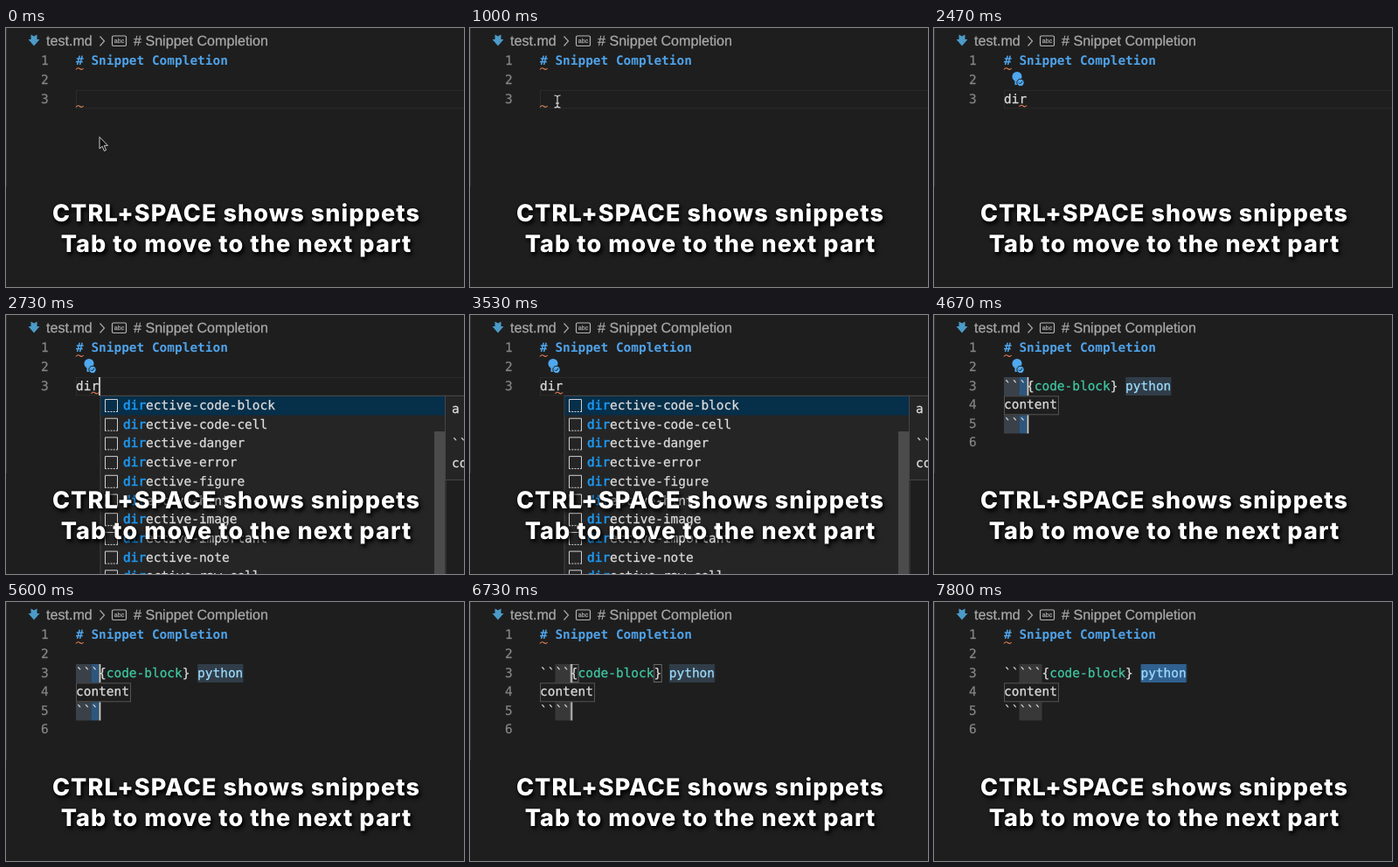
Write an HTML page that moves like this. It is 524 px wide and 296 px high and loops after 8 s.

```html
<!DOCTYPE html>
<html lang="en">
<head>
<meta charset="utf-8">
<title>Snippet Completion</title>
<style>
html, body { margin: 0; width: 100%; height: 100%; overflow: hidden; background: #1e1e1e; }
svg { display: block; width: 524px; height: 296px; }
text { white-space: pre; text-rendering: geometricPrecision; }
.code { font: 14.45px "DejaVu Sans Mono", monospace; color: #dcdcdc; }
.code text, .crumb text { fill: currentColor; stroke: currentColor; stroke-width: .25; }
.code .head { font-weight: 700; color: #4fa3ea; stroke: none; }
.code .num { color: #858585; }
.code .hit { color: #1c9bf6; stroke-width: .5; }
.code .name { color: #3fc9a2; }
.code .arg { color: #9cdcfe; }
.crumb { font: 16.1px "Liberation Sans", Arial, sans-serif; color: #a9a9a9; }
.title { font: 800 27px Inter, "Open Sans", sans-serif; letter-spacing: 1.1px; fill: #fff;
  text-anchor: middle; filter: drop-shadow(0 0 1.5px #000a) drop-shadow(2px 3px 2px #000); }
.wave { fill: none; stroke: #df7d55; stroke-width: 1.1; }
.box { fill: none; stroke: #6a6a6a; }
.caret { fill: #d6d6d4; }
.slot { fill: #383838; }

/* every clock-driven part shares one 8 s loop */
.move, .arrow, .beam, .type, .live, .hint, .fix, .menu, .info, .insert, .pick, .slot,
.tick4, .tick5, .tail, .pair, .caret, .chosen, .idle { animation: 8s step-end infinite; }

.move { animation-name: move; animation-timing-function: linear; }
@keyframes move {
  0%, .9% { transform: translate(107px, 124px); animation-timing-function: ease-in-out; }
  7.5%, 100% { transform: translate(100px, 84px); }
}
.arrow { animation-name: arrow; }
@keyframes arrow { 0% { opacity: 1 } 3.3%, 100% { opacity: 0 } }
.beam { animation-name: beam; }
@keyframes beam { 0% { opacity: 0 } 3.3% { opacity: 1 } 15.87%, 100% { opacity: 0 } }

/* typing "dir" */
.d { animation-name: key-d; }
.i { animation-name: key-i; }
.r { animation-name: key-r; }
@keyframes key-d { 0% { opacity: 0 } 15.87% { opacity: 1 } 57.5%, 100% { opacity: 0 } }
@keyframes key-i { 0% { opacity: 0 } 19.1% { opacity: 1 } 57.5%, 100% { opacity: 0 } }
@keyframes key-r { 0% { opacity: 0 } 21.2% { opacity: 1 } 57.5%, 100% { opacity: 0 } }
.live { animation-name: live; }
@keyframes live { 0% { opacity: 1 } 57.5%, 100% { opacity: 0 } }
.hint { animation-name: hint; }
@keyframes hint { 0% { opacity: 1 } 26.6%, 100% { opacity: 0 } }
.fix { animation-name: fix; }
@keyframes fix { 0% { opacity: 0 } 26.6% { opacity: 1 } 66.2%, 100% { opacity: 0 } }
.menu { animation-name: menu; }
@keyframes menu { 0% { opacity: 0 } 31.6% { opacity: 1 } 57.5%, 100% { opacity: 0 } }
.info { animation-name: info; }
@keyframes info { 0% { opacity: 0 } 33.2% { opacity: 1 } 57.5%, 100% { opacity: 0 } }

/* inserted snippet */
.insert { animation-name: insert; }
@keyframes insert { 0% { opacity: 0 } 57.5%, 100% { opacity: 1 } }
.pick { animation-name: pick; }
@keyframes pick { 0% { opacity: 1 } 80%, 100% { opacity: 0 } }
.slot { animation-name: slot; }
@keyframes slot {
  0% { width: 0 } 80% { width: 8.7px } 83.3% { width: 17.4px } 86.6%, 100% { width: 26.1px }
}
.tick4 { animation-name: tick4; }
@keyframes tick4 { 0% { opacity: 0 } 83.3%, 100% { opacity: 1 } }
.tick5 { animation-name: tick5; }
@keyframes tick5 { 0% { opacity: 0 } 86.6%, 100% { opacity: 1 } }
.tail { animation-name: tail; }
@keyframes tail {
  0% { transform: translateX(0) } 83.3% { transform: translateX(8.7px) }
  86.6%, 100% { transform: translateX(17.4px) }
}
.pair { animation-name: pair; }
@keyframes pair { 0% { opacity: 0 } 80% { opacity: 1 } 91.6%, 100% { opacity: 0 } }
.idle { animation-name: idle; }
@keyframes idle { 0% { opacity: 1 } 91.6%, 100% { opacity: 0 } }
.chosen { animation-name: chosen; }
@keyframes chosen { 0% { opacity: 0 } 91.6%, 100% { opacity: 1 } }

/* carets */
.caret.first { animation-name: caret-first; }
@keyframes caret-first {
  0% { opacity: 0; transform: translateX(0) }
  6.6% { opacity: 1 } 12.4% { opacity: 0 }
  15.87% { opacity: 1; transform: translateX(8.7px) }
  19.1% { transform: translateX(17.4px) }
  21.2% { transform: translateX(26.1px) }
  27.4% { opacity: 0 } 33.5% { opacity: 1 } 40% { opacity: 0 } 46.2% { opacity: 1 }
  52.5%, 100% { opacity: 0; transform: translateX(26.1px) }
}
.caret.multi { animation-name: caret-multi; }
@keyframes caret-multi {
  0% { opacity: 0; transform: translateX(0) }
  57.5% { opacity: 1 } 63.1% { opacity: 0 } 69.4% { opacity: 1 } 75.6% { opacity: 0 } 80% { opacity: 1 }
  83.3% { transform: translateX(8.7px) }
  86.6% { transform: translateX(17.4px) }
  91.6%, 100% { opacity: 0; transform: translateX(17.4px) }
}
.caret.last { animation-name: caret-last; }
@keyframes caret-last { 0% { opacity: 0 } 91.6% { opacity: 1 } 97.4%, 100% { opacity: 0 } }
</style>
</head>
<body>
<svg viewBox="0 0 524 296" xmlns="http://www.w3.org/2000/svg">
  <rect width="524" height="296" fill="#1e1e1e"/>
  <rect width="1" height="181" fill="#363636"/>

  <g class="crumb">
    <path d="M28.500 7.500l3.500 2 3.500-2v5.500h3l-6.500 7.500-6.500-7.500h3z" fill="#4b9bc8"/>
    <text x="46" y="20">test.md</text>
    <path d="M107.500 9.500l5 5.500-5 5.500" fill="none" stroke="#a9a9a9" stroke-width="1.200"/>
    <rect x="121.500" y="9" width="16" height="11.500" rx="1.500" fill="none" stroke="#b4b4b4" stroke-width="1.200"/>
    <text x="129.500" y="17" text-anchor="middle" style="font-size:7px">abc</text>
    <text x="146" y="20"># Snippet Completion</text>
  </g>

  <g class="code">
    <text class="num" x="40" y="42">1</text>
    <text class="num" x="40" y="63.700">2</text>
    <text class="num" x="40" y="85.500">3</text>
    <text class="head" x="80" y="42"># Snippet Completion</text>
    <path class="wave" d="M80 47.500q2.200-3 4.400-1t4.400-.5"/>

    <g class="live">
      <rect x="80.500" y="71.300" width="450" height="20.500" fill="none" stroke="#2b2b2b"/>
      <path class="wave hint" d="M80 90.500q2.200-3 4.400-1t4.400-.5" style="stroke:#cf8a5a"/>
    </g>
    <g class="fix">
      <path class="wave" d="M97.400 90q2.200-3 4.400-1t4.400-.5"/>
      <circle cx="95" cy="55.500" r="5.500" fill="#4fa8f0"/>
      <path d="M92.500 60h5v5h-5z" fill="#4fa8f0"/>
      <circle cx="99" cy="62.500" r="4.200" fill="#4fa8f0" stroke="#1e1e1e"/>
      <path d="M97 62.500l1.500 1.500 2.500-3" fill="none" stroke="#1e1e1e"/>
    </g>
    <text class="type d" x="80" y="85.500">d</text>
    <text class="type i" x="88.700" y="85.500">i</text>
    <text class="type r" x="97.400" y="85.500">r</text>
    <rect class="caret first" x="80" y="71" width="1.800" height="21"/>

    <g class="menu">
      <rect x="108" y="92.500" width="395" height="220" fill="#252526" stroke="#454545"/>
      <rect x="108.500" y="93" width="394" height="21.500" fill="#062f4a"/>
      <g id="rows"></g>
      <rect x="490" y="133" width="12" height="163" fill="#4b4b4c"/>
    </g>
    <g class="info">
      <rect x="502.500" y="92.500" width="40" height="96" fill="#252526" stroke="#454545"/>
      <text x="510" y="112">a</text>
      <text x="510" y="152">``</text>
      <text x="510" y="174">co</text>
    </g>

    <g class="insert">
      <text class="num" x="40" y="107">4</text>
      <text class="num" x="40" y="128.700">5</text>
      <text class="num" x="40" y="150.200">6</text>
      <g id="fences"></g>
      <g class="tail">
        <rect class="idle" x="219.200" y="71" width="52.200" height="21" fill="#303d48"/>
        <rect class="chosen" x="219.200" y="71" width="52.200" height="21" fill="#30608f"/>
        <g class="pair">
          <rect class="box" x="106.500" y="71.500" width="8.700" height="20"/>
          <rect class="box" x="201.800" y="71.500" width="8.700" height="20"/>
        </g>
        <text x="106.100" y="85.500">{<tspan class="name">code-block</tspan>} <tspan class="arg">python</tspan></text>
      </g>
      <rect class="box" x="80.500" y="92.800" width="62" height="21" style="stroke:#545454"/>
      <text x="80" y="107">content</text>
      <g id="carets"></g>
      <rect class="caret last" x="288.200" y="71" width="1.800" height="21"/>
    </g>
  </g>

  <g class="move">
    <path class="arrow" d="M0 .5v13.500l3.100-2.800 2.300 5.300 2.200-1-2.300-5.200h4.200z" fill="#111" stroke="#ddd" stroke-width=".9"/>
    <path class="beam" d="M-3.500-7q3 0 3.500 1.500 .5-1.500 3.500-1.500M0-5.500v11M-3.500 7q3 0 3.500-1.500 .5 1.500 3.500 1.500M-2 2h4" fill="none" stroke="#e8e8e8" stroke-width="1.100"/>
  </g>

  <g class="title">
    <text x="263.500" y="220.500">CTRL+SPACE shows snippets</text>
    <text x="263.500" y="256">Tab to move to the next part</text>
  </g>
</svg>
<script>
const fill = (id, html) => { document.getElementById(id).innerHTML = html; };
const pitch = 21.7;
const kinds = ['code-block', 'code-cell', 'danger', 'error', 'figure', 'hint', 'image', 'important', 'note', 'raw-cell'];

const row = (kind, n) => `<g transform="translate(113 ${96 + n * pitch})">
  <path d="M.5 14.500V.5h14v14" fill="none" stroke="#d0d0d0"/>
  <path d="M0 14.500h15" stroke="#d0d0d0" stroke-dasharray="2 1.250"/>
  <text x="21" y="12"><tspan class="hit">dir</tspan>ective-${kind}</text></g>`;

const fence = y => `<g transform="translate(0 ${y})">
  <rect class="slot" x="97.400" y="71" height="21"/>
  <g class="pick">
    <rect x="80" y="71" width="17.400" height="21" fill="#3a4149"/>
    <rect x="97.400" y="71" width="8.700" height="21" fill="#2e567d"/>
  </g>
  <text x="80" y="85.500">\`\`\`</text>
  <text class="tick4" x="106.100" y="85.500">\`</text>
  <text class="tick5" x="114.800" y="85.500">\`</text></g>`;

const caret = y => `<g transform="translate(0 ${y})">
  <rect class="caret multi" x="106.500" y="71" width="1.800" height="21"/></g>`;

const lines = [0, 2 * pitch];
fill('rows', kinds.map(row).join(''));
fill('fences', lines.map(fence).join(''));
fill('carets', lines.map(caret).join(''));
</script>
</body>
</html>
```
